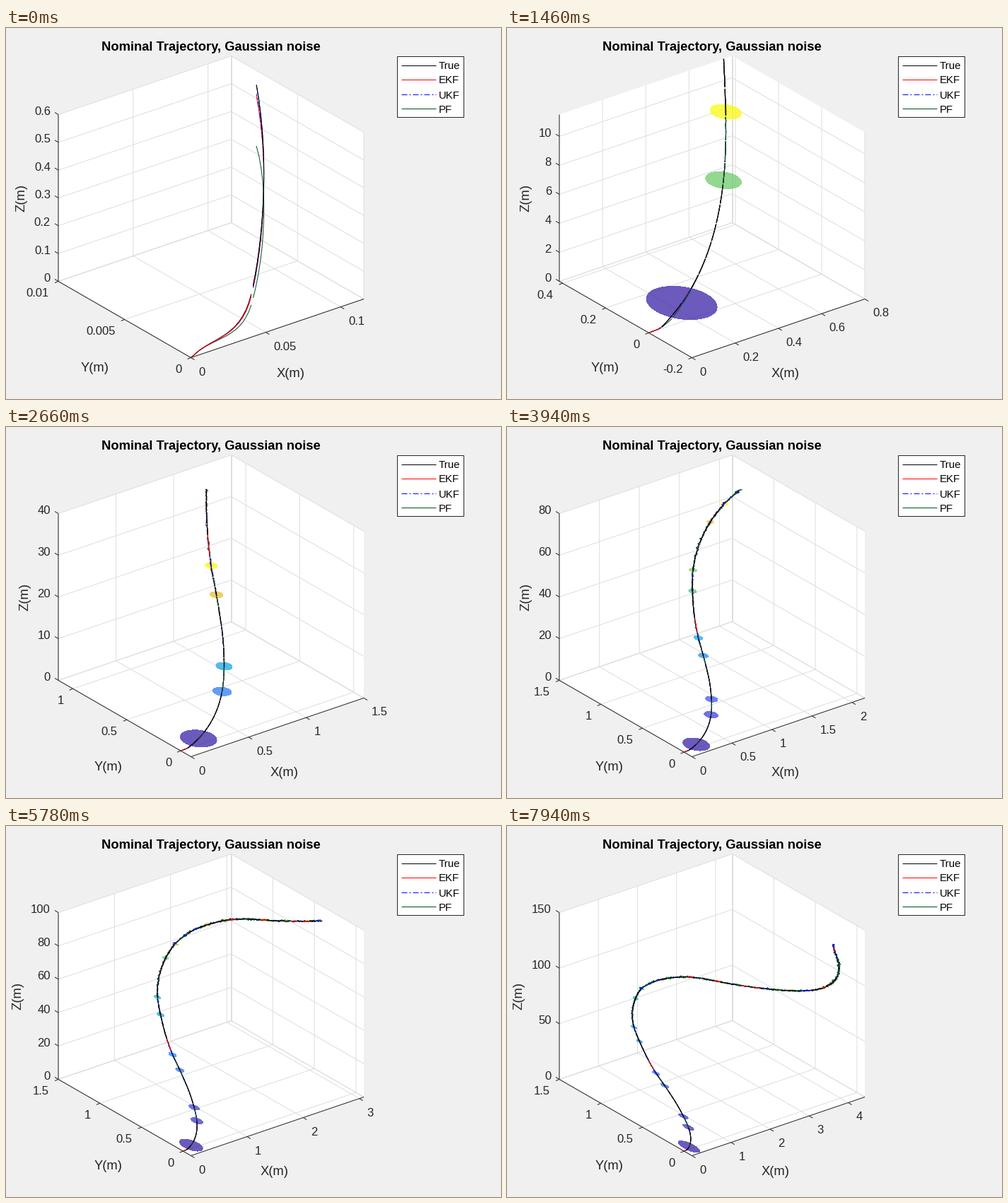
These frames come from a looping animation (700 by 525 pixels, 8 s). A matplotlib script:

```python
import math

import matplotlib.pyplot as plt
import numpy as np
from matplotlib.animation import FuncAnimation
from matplotlib.collections import LineCollection, PolyCollection

plt.rcParams["font.family"] = "Liberation Sans"
PX = 0.72  # points per pixel at 100 dpi
INK = "#262626"
TICK_FONT = 16.67

# Box geometry on the stage: front corner and the three edge vectors
ORIGIN = np.array([261, 466])
EX = np.array([244.5, -83])
EY = np.array([-187.5, -108])
EZ = np.array([0, -236])

# step, x, y, z along the flight
KNOTS = np.array([
    (-2, 0, 0, 0), (-1, .058, .002, .068), (0, .1155, .0081, .548),
    (1, .174, .0215, 1.0), (8.2, .553, .208, 5.95), (11.2, .684, .329, 8.97),
    (13, .76, .415, 11.5), (18.2, .94, .674, 18.6), (21.2, 1.035, .825, 22.4),
    (28, 1.285, 1.135, 33.8), (31.2, 1.44, 1.279, 39.2),
    (38.2, 1.825, 1.441, 53.6), (41.2, 2.025, 1.463, 59.2),
    (44, 2.16, 1.398, 65.8), (48.2, 2.36, 1.295, 71.7),
    (51.2, 2.51, 1.19, 75.5), (61.2, 2.86, .70, 85.2),
    (67, 3.08, .411, 91.1), (79, 3.63, .005, 104.2),
    (87, 4.05, .039, 113), (94, 4.425, .292, 120.8)])
KS, KP = KNOTS[:, 0], KNOTS[:, 1:]
SLOPE = np.gradient(KP, KS, axis=0)

PARULA_AT = np.array([0, .125, .25, .375, .5, .625, .75, .875, 1])
PARULA = np.array([
    (.242, .150, .660), (.281, .322, .958), (.180, .530, .970),
    (.100, .670, .870), (.150, .750, .670), (.440, .800, .420),
    (.800, .760, .180), (.996, .760, .230), (.977, .984, .081)])


def path(s):
    """Cubic Hermite curve through the knots."""
    s = np.asarray(s, float)
    i = np.clip(np.searchsorted(KS, s, "right") - 1, 0, len(KS) - 2)
    h = KS[i + 1] - KS[i]
    t = ((s - KS[i]) / h)[..., None]
    h = h[..., None]
    return ((1 + 2 * t) * (1 - t) ** 2 * KP[i] + t * (1 - t) ** 2 * h * SLOPE[i]
            + t * t * (3 - 2 * t) * KP[i + 1] + t * t * (t - 1) * h * SLOPE[i + 1])


# Samples: one chunk per step with a small gap between chunks
STEPS, PER = 96, 16
rows = [np.linspace(c + .06, c + 1, PER - 1) for c in range(-2, STEPS - 2)]
rows[0][0] = -2
S = np.concatenate([np.append(r, r[-1]) for r in rows])
GAP = np.arange(len(S)) % PER == PER - 1
TRUE = path(S)
rng = np.random.default_rng(4)


def estimate(lag, jitter):
    """Flight path as a filter sees it: early lag in height, later noise."""
    grow = np.clip((S + 2) / 46, 0, 1) ** 2
    noise = rng.normal(size=TRUE.shape)
    noise = (noise + np.roll(noise, 1, axis=0)) / math.sqrt(2)
    p = TRUE + noise * grow[:, None] * jitter * np.array([.012, .006, .2])
    tau = np.clip((S + 2) / 2, 0, 1)
    p[:, 2] -= lag * tau ** 2.5 * np.exp(-np.clip(S, 0, None) / 2)
    return p


DASHDOT = (0, (8, 3, 2, 3))
SERIES = [("True", "black", "-", TRUE.copy()),
          ("EKF", "red", "-", estimate(.04, .5)),
          ("UKF", "blue", DASHDOT, estimate(.032, .8)),
          ("PF", "#00501e", "-", estimate(.22, 1.0))]
for *_, p in SERIES:
    p[GAP] = np.nan

# Which curve lies in front within each chunk
front = rng.choice(4, STEPS, p=[.55, .1, .15, .2])
front[:2] = 1, 0
FRONT = np.repeat(front, PER)

DISC_S = np.array([1.0] + [b + 10 * k for k in range(9) for b in (8.2, 11.2)])
DISC_P = path(DISC_S)
DISC_R = .183 / np.sqrt(DISC_S + 1.5)
ANGLE = np.linspace(0, 2 * np.pi, 48, endpoint=False)


def nice_top(v):
    base = 10 ** math.floor(math.log10(v))
    for m in (1, 1.5, 2, 3, 4, 6, 8, 10):
        c = m * base
        if c >= v:
            return c if c - v <= .25 * v else v
    return v


def nice_step(span, most):
    s = span / most
    base = 10 ** math.floor(math.log10(s))
    return next(m * base for m in (1, 2, 5, 10) if m * base >= s * (1 - 1e-9))


def limits(state, n, discs):
    hi = TRUE[:n].max(axis=0)
    lo = 0.0
    if discs:
        p, r = DISC_P[:discs], DISC_R[:discs]
        hi[:2] = np.maximum(hi[:2], (p[:, :2] + r[:, None]).max(axis=0))
        lo = (p[:, 1] - r).min()
        span = hi[1] - lo
        step = nice_step(span, 4.5)
        tick = math.floor(lo / step) * step
        if lo - tick <= .25 * span:
            lo = tick
    return np.array([0, lo, 0]), np.array([nice_top(v) for v in hi])


def ticks(lo, hi, most):
    step = nice_step(hi - lo, most)
    first = math.ceil(lo / step - 1e-6)
    last = math.floor(hi / step + 1e-6)
    return [(f"{k * step:g}", (k * step - lo) / (hi - lo))
            for k in range(first, last + 1)]


def stage(u, v, w):
    return ORIGIN + u * EX + v * EY + w * EZ


def project(p, lo, hi):
    q = (p - lo) / (hi - lo)
    return ORIGIN + q[:, :1] * EX + q[:, 1:2] * EY + q[:, 2:] * EZ


def width(label):
    em = {".": .278, "-": .333}
    return TICK_FONT * sum(em.get(c, .556) for c in label)


fig = plt.figure(figsize=(7, 5.25), dpi=100, facecolor="#f0f0f0")
ax = fig.add_axes([0, 0, 1, 1])
ax.set_xlim(-.5, 699.5)
ax.set_ylim(524.5, -.5)
ax.axis("off")


def text(x, y, s="", size=TICK_FONT, **kw):
    kw = {"color": INK, "va": "baseline", **kw}
    return ax.text(x, y, s, fontsize=size * PX, **kw)


def line(pts, color, z, style="-"):
    xy = np.asarray(pts, float).reshape(-1, 2)
    return ax.plot(xy[:, 0], xy[:, 1], color=color, lw=PX, ls=style, zorder=z,
                   solid_capstyle="butt", dash_capstyle="butt")[0]


hexagon = [stage(*c) for c in ((0, 0, 0), (1, 0, 0), (1, 0, 1),
                               (1, 1, 1), (0, 1, 1), (0, 1, 0))]
ax.add_patch(plt.Polygon(hexagon, fc="white", ec="none", zorder=0))
grid = ax.add_collection(LineCollection([], colors="#dedede", linewidths=PX, zorder=1))
marks = ax.add_collection(LineCollection([], colors=INK, linewidths=PX, zorder=2))
line([stage(0, 1, 1), stage(0, 1, 0), stage(0, 0, 0), stage(1, 0, 0)], INK, 2)
discs_art = ax.add_collection(PolyCollection([], edgecolors="none", zorder=3))
discs_art.set_antialiased(False)

lines = [line([], color, 4, style) for _, color, style, _ in SERIES]
tops = [line([], color, 5, style) for _, color, style, _ in SERIES]

text(289.5, 31, "Nominal Trajectory, Gaussian noise", 18.33,
     color="black", weight="bold", ha="center")
names = [text(0, 493, "X(m)", 18.33, ha="center"),
         text(0, 486, "Y(m)", 18.33, ha="center"),
         text(0, 240, "Z(m)", 18.33, ha="center", va="center", rotation=90)]
labels = [[text(0, 0, ha=side) for _ in range(9)]
          for side in ("left", "right", "right")]

ax.add_patch(plt.Rectangle((552, 39), 94, 86, fc="white", ec=INK, lw=PX, zorder=6))
for (name, color, style, _), y in zip(SERIES, (52, 72, 93, 113)):
    line([(558, y), (607, y)], color, 7, style)
    text(611, y + 6, name, 15, color="black", zorder=7)

# Per axis: tick place, tick mark direction, label offset, grid polyline
AXES = [
    (lambda a: stage(a, 0, 0), (5, 3), (11, 25),
     lambda a: [stage(a, 0, 0), stage(a, 1, 0), stage(a, 1, 1)]),
    (lambda a: stage(0, a, 0), (-5, 2), (-13, 22),
     lambda a: [stage(0, a, 0), stage(1, a, 0), stage(1, a, 1)]),
    (lambda a: stage(0, 1, a), (-5, -3), (-11, .5),
     lambda a: [stage(0, 1, a), stage(1, 1, a), stage(1, 0, a)])]
BACK = [[stage(1, 1, 0), stage(1, 1, 1)],
        [stage(0, 1, 0), stage(1, 1, 0), stage(1, 0, 0)]]


def draw_axes(lo, hi):
    mesh, dashes, widest = list(BACK), [], []
    for k, (place, out, off, net) in enumerate(AXES):
        marked = ticks(lo[k], hi[k], 7 if k == 2 else 4.5)
        widest.append(max(width(s) for s, _ in marked))
        for t in labels[k]:
            t.set_visible(False)
        for t, (s, a) in zip(labels[k], marked):
            p = place(a)
            t.set(text=s, position=p + off, visible=True)
            dashes.append([p, p + out])
            mesh.append(net(a))
    grid.set_segments(mesh)
    marks.set_segments(dashes)
    names[0].set_x(369.7 + widest[0])
    names[1].set_x(167.2 - widest[1])
    names[2].set_x(44.6 - widest[2])


def draw_discs(count, lo, hi):
    p, r = DISC_P[:count], DISC_R[:count]
    shapes, colors = [], []
    for c, rad in zip(p, r):
        ring = np.stack([c[0] + rad * np.cos(ANGLE), c[1] + rad * np.sin(ANGLE),
                         np.full(ANGLE.shape, c[2])], axis=1)
        shapes.append(project(ring, lo, hi))
        f = (c[2] - p[0, 2]) / max(p[-1, 2] - p[0, 2], 1e-9)
        colors.append([np.interp(f, PARULA_AT, PARULA[:, j]) for j in range(3)] + [.76])
    discs_art.set_verts(shapes)
    discs_art.set_facecolor(colors if colors else "none")


def update(frame):
    t = frame * 20
    state = 0 if t < 500 else 1 + (t - 500) // 80
    n = (state + 2) * PER
    count = int((DISC_S <= state).sum())
    lo, hi = limits(state, n, count)
    draw_axes(lo, hi)
    draw_discs(count, lo, hi)
    for k, (*_, p) in enumerate(SERIES):
        xy = project(p[:n], lo, hi)
        lines[k].set_data(xy[:, 0], xy[:, 1])
        tops[k].set_data(xy[:, 0], np.where(FRONT[:n] == k, xy[:, 1], np.nan))
    return []


anim = FuncAnimation(fig, update, frames=400, interval=20, repeat=True,
                     repeat_delay=0, init_func=lambda: update(0), blit=False)
plt.show()
```
